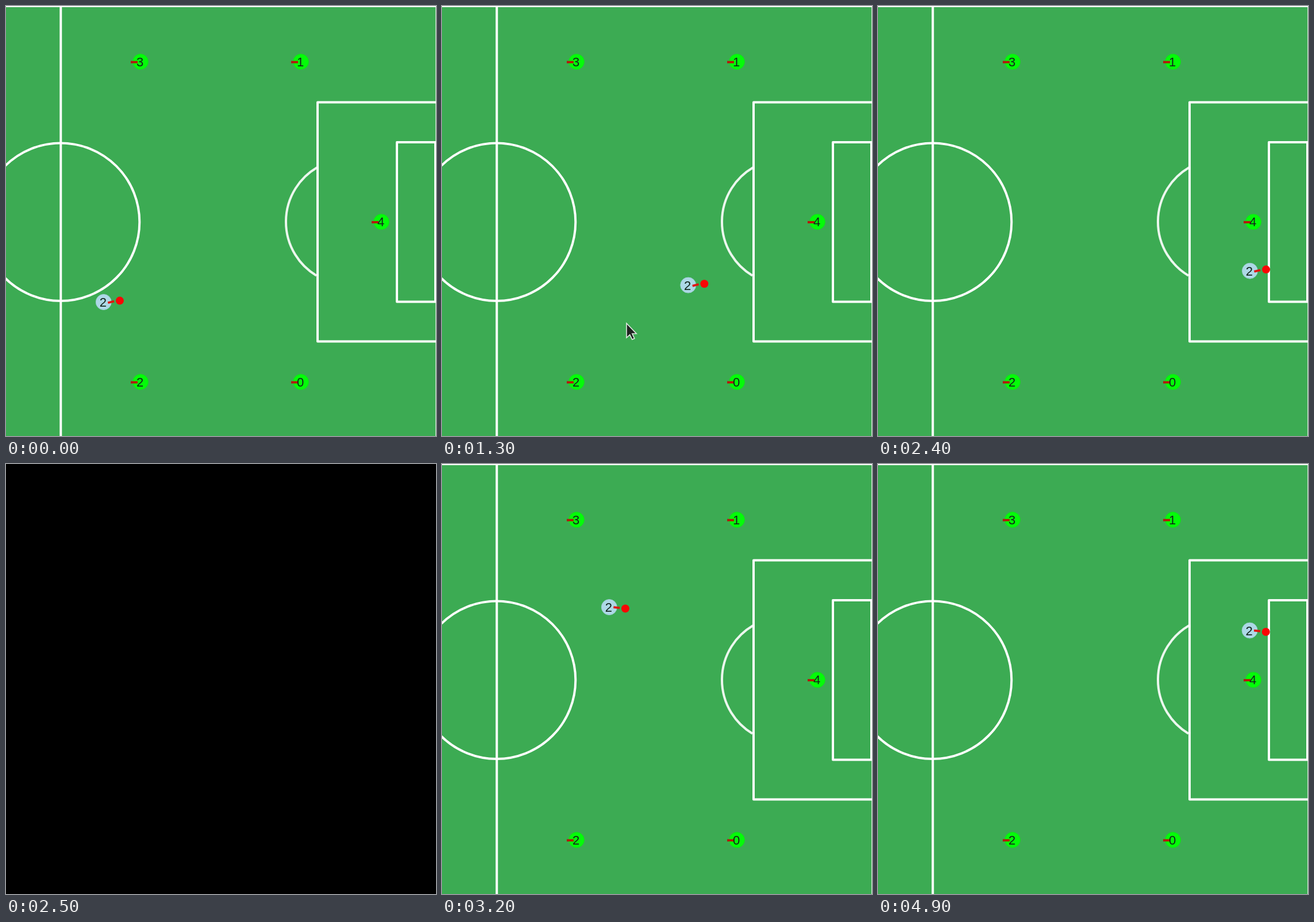
Animation, 748 px wide and 748 px high, one loop 5000 ms. Source, as an HTML page:

```html
<!DOCTYPE html>
<html lang="en">
<head>
<meta charset="utf-8">
<title>Dribble on a half pitch</title>
<style>
  html, body { margin: 0; height: 100%; overflow: hidden; background: #000; }
  svg { display: block; width: 100vw; height: 100vh; }
  text { font: 22px "Liberation Sans", Arial, sans-serif; text-anchor: middle; fill: #12251a; }
  .soft { filter: blur(.6px); }
  .lines { fill: none; stroke: #fff; stroke-width: 4; stroke-linejoin: round; }
  .rival circle { fill: #04fc08; stroke: #14dc1e; }
  .rival path { stroke: #b5170b; stroke-width: 4; }
  #runner circle { fill: #add8e6; stroke: #9ccbd0; }
  #runner path { stroke: #e0160f; stroke-width: 3.8; }
</style>
</head>
<body>
<svg viewBox="0 0 748 748">
  <g id="scene">
    <rect width="748" height="748" fill="#3cab53"/>
    <g class="soft">
      <g class="lines">
        <path d="M-9 0H757"/>
        <path d="M748 -9V757" stroke-width="2" opacity=".8"/>
        <path d="M95.3 -9V757"/>
        <circle cx="95" cy="375.7" r="137.3"/>
        <path d="M757 167.5H542V583.5H757M747 237H680V514.5H747Z"/>
        <path d="M541 281A109.3 109.3 0 0 0 540 469" opacity=".9"/>
      </g>
      <g id="rivals"></g>
      <g id="runner">
        <circle r="13.5"/>
        <path/>
        <text x="-1" y="8">2</text>
      </g>
      <circle id="ball" r="7" fill="#f90505"/>
      <path id="cursor" d="M0 0V25L5.7 19.8 9.8 28.2 13.8 26.3 9.9 18H17.2Z" fill="#1e2420" stroke="#dfe9e1" stroke-width="1.6"/>
    </g>
  </g>
</svg>
<script>
const LOOP = 5000, STEP = 100, CUT = 2500;
const SLOPE = 0.1138;
const $ = id => document.getElementById(id);
const place = (el, x, y) => el.setAttribute("transform", `translate(${x} ${y})`);
const show = (el, on) => el.style.display = on ? "" : "none";

// Four rivals on the corners of a rectangle, the last one in front of goal
const rival = n => {
  const [x, y] = n < 4 ? [n < 2 ? 513 : 234, n % 2 ? 97 : 654] : [653, 375.5];
  return `<g class="rival" transform="translate(${x} ${y})"><circle r="13.5"/>
    <path d="M-17 .6H-5"/><text x="-1" y="7.6">${n}</text></g>`;
};
$("rivals").innerHTML = [0, 1, 2, 3, 4].map(rival).join("");

// The second run mirrors the first and speeds up near the end
const lowX = t => 169.8 + 0.1988 * t;
const highX = t => 173.6 + 0.1954 * (t - 2600) + 0.0295 * Math.max(0, t - 4100);

function draw(now) {
  const t = Math.floor(now % LOOP / STEP) * STEP;
  const high = t > CUT, dir = high ? 1 : -1;
  const x = high ? highX(t) : lowX(t);
  const y = (high ? 235.3 : 515) + dir * SLOPE * (x - 170);

  show($("scene"), t !== CUT);
  place($("runner"), x, y);
  $("runner").querySelector("path").setAttribute("d", `M7.5 ${high ? 0 : 1.2}L18.3 ${1.4 * dir}`);
  place($("ball"), x + 28.1, y + 2.4 * dir);

  show($("cursor"), t >= 400 && t < 1900);
  place($("cursor"), 321, Math.max(552, 735 - 0.65 * (t - 400)));
}

const start = performance.now();
function tick() {
  draw(performance.now() - start);
  requestAnimationFrame(tick);
}
tick();
</script>
</body>
</html>
```
